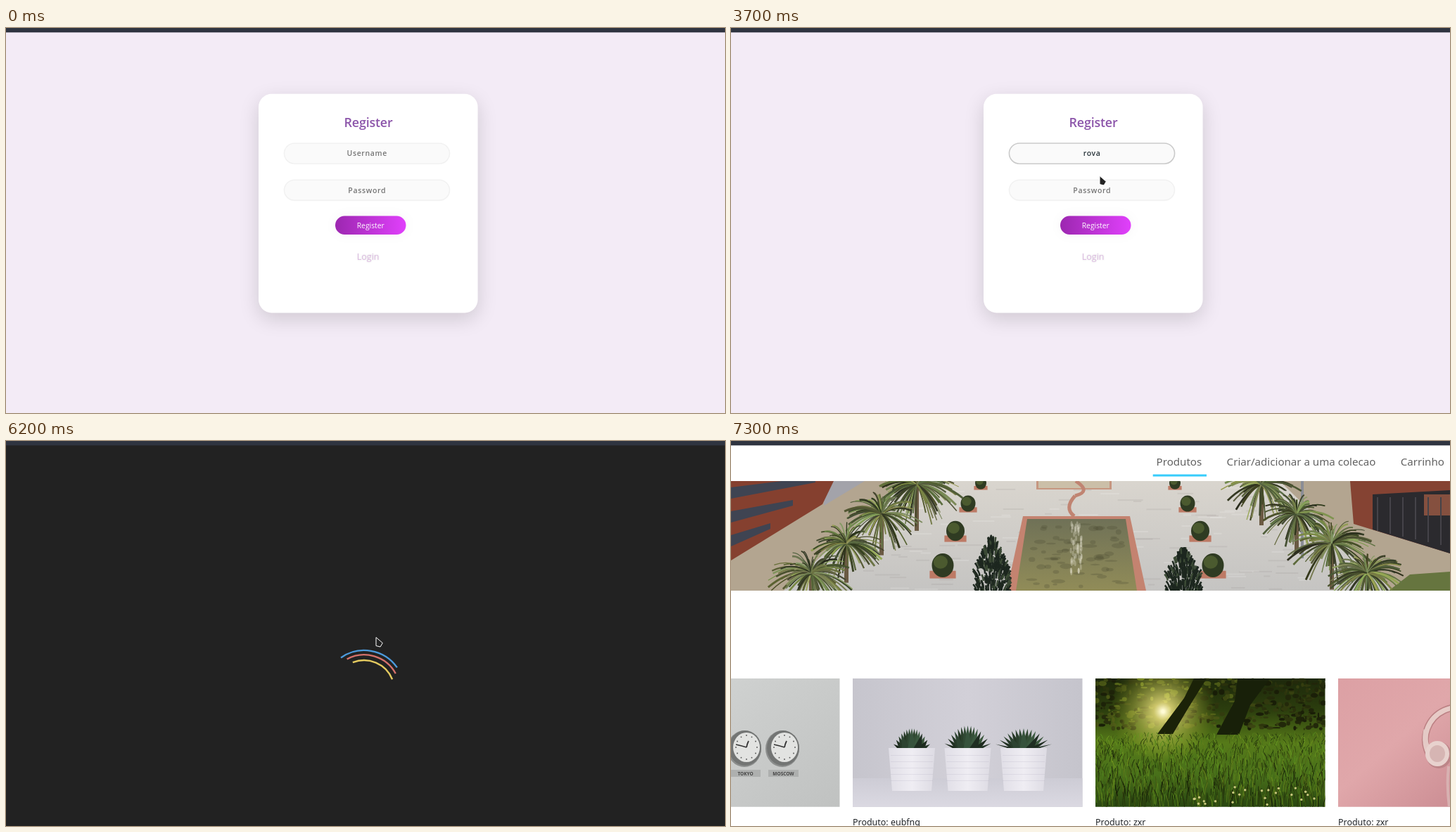
An HTML page with a canvas that plays this animation: 1022x548 px, repeating every 8.7 s.

```html
<!DOCTYPE html>
<html lang="pt">
<head>
<meta charset="utf-8">
<title>Register</title>
<style>
html, body { margin: 0; width: 100%; height: 100%; overflow: hidden; background: #f3ebf6; }
canvas { display: block; }
</style>
</head>
<body>
<canvas id="stage" width="1022" height="548"></canvas>
<script>
const W = 1022, H = 548, LOOP = 8700, STEP = 100;
const FORM = '"Open Sans", "Noto Sans", sans-serif';
const PAGE = '"Noto Sans", "Open Sans", sans-serif';
const LOGIN = 'rova';
const view = document.getElementById('stage').getContext('2d');
let c = view;

const clamp = p => Math.min(1, Math.max(0, p));
const easeOut = p => 1 - (1 - p) ** 1.6;
const smooth = p => p * p * (3 - 2 * p);
const cubic = p => p < .5 ? 4 * p ** 3 : 1 - 4 * (1 - p) ** 3;

// pointer strokes: each bends on its way to the next resting place
const MOVES = [
  { from: 200, to: 800, bend: [550, 92], end: [513, 183], ease: easeOut },
  { from: 3600, to: 3800, bend: [524, 210], end: [534, 236], ease: smooth },
  { from: 4900, to: 5500, bend: [555, 250], end: [525.5, 279], ease: easeOut },
  { from: 6550, to: 7300, bend: [545, 132], end: [493, -15], ease: smooth }
];

function seeded(s) {
  return () => (s = (s * 16807) % 2147483647) / 2147483647;
}

function times(n, fn) {
  for (let i = 0; i < n; i++) fn(i);
}

function poly(color, ...p) {
  c.fillStyle = color;
  c.beginPath();
  for (let i = 0; i < p.length; i += 2) c.lineTo(p[i], p[i + 1]);
  c.closePath();
  c.fill();
}

function taper(color, x, top, halfTop, bottom, halfBottom) {
  poly(color, x - halfTop, top, x + halfTop, top, x + halfBottom, bottom, x - halfBottom, bottom);
}

function rect(color, x, y, w, h) {
  c.fillStyle = color;
  c.fillRect(x, y, w, h);
}

function oval(color, x, y, rx, ry = rx) {
  c.fillStyle = color;
  c.beginPath();
  c.ellipse(x, y, rx, ry, 0, 0, 7);
  c.fill();
}

function pill(color, x, y, w, h, r = h / 2) {
  c.fillStyle = color;
  c.beginPath();
  c.roundRect(x, y, w, h, r);
  c.fill();
}

function curve(color, width, x0, y0, x1, y1, x2, y2) {
  c.strokeStyle = color;
  c.lineWidth = width;
  c.beginPath();
  c.moveTo(x0, y0);
  c.quadraticCurveTo(x1, y1, x2, y2);
  c.stroke();
}

function shade(x0, y0, x1, y1, ...colors) {
  const g = c.createLinearGradient(x0, y0, x1, y1);
  colors.forEach((k, i) => g.addColorStop(i / (colors.length - 1), k));
  return g;
}

function text(s, x, y, font, color, align = 'left', gap = 0) {
  c.font = font;
  c.fillStyle = color;
  c.textAlign = align;
  c.letterSpacing = gap + 'px';
  c.fillText(s, x, y);
  const w = c.measureText(s).width;
  c.letterSpacing = '0px';
  return w;
}

function shadow(color, blur, dy, draw) {
  c.save();
  c.shadowColor = color;
  c.shadowBlur = blur;
  c.shadowOffsetY = dy;
  draw();
  c.restore();
}

function layer(draw) {
  const el = document.createElement('canvas');
  el.width = W;
  el.height = H;
  c = el.getContext('2d');
  draw();
  c = view;
  return el;
}

function clip(x, y, w, h, draw) {
  c.save();
  c.beginPath();
  c.rect(x, y, w, h);
  c.clip();
  draw();
  c.restore();
}

function drawForm() {
  rect('#f3ebf6', 0, 0, W, H);
  shadow('rgba(0,0,0,.15)', 28, 8.6, () => pill('#fff', 359, 93.8, 311.6, 311.6, 18.7));
  text('Register', 515, 141, '600 17.9px ' + FORM, '#8c55aa', 'center', -0.2);
  shadow('rgba(0,0,0,.04)', 16, 0, () =>
    pill(shade(468, 0, 568, 0, '#9c27b0', '#e040fb'), 468, 267.5, 100.5, 26.5));
  text('Register', 518.2, 284.6, '10.3px ' + FORM, '#fff', 'center');
  shadow('rgba(117,117,117,.25)', 2.3, 0, () =>
    text('Login', 514.6, 329.6, '12.5px ' + FORM, '#dcbbe1', 'center'));
}

function bush(x, y, r) {
  rect('#bd7a65', x - r * 1.2, y + r * .5, r * 2.4, r * .7);
  oval('#2f3b22', x, y, r, r * 1.1);
  oval('#4b5a2f', x - r * .2, y - r * .3, r * .65, r * .6);
}

function cypress(x, top, w, rnd) {
  times(260, i => {
    const k = rnd(), y = top + 8 + k * (213 - top);
    const px = x + (rnd() - .5) * w * Math.min(1, .15 + k * 1.5);
    curve(i % 4 ? '#1d271f' : '#3b4a35', 2.5, px, y, px, y - 4, px + (px - x) * .2, y - 9);
  });
}

function palm(x, y, r, rnd) {
  rect('#6b5a43', x - 3, y, 6, r);
  times(100, i => {
    const a = rnd() * 6.283, l = r * (.4 + rnd() * .6);
    const ex = x + Math.cos(a) * l, ey = y + Math.sin(a) * l * .75 + l * .2;
    const tone = `hsl(${62 + rnd() * 25} ${18 + rnd() * 16}% ${14 + rnd() * 38}%)`;
    curve(tone, 1 + rnd() * 2, x, y, (x + ex) / 2, (y + ey) / 2 - l * .25, ex, ey);
  });
}

function plaza() {
  const rnd = seeded(41);
  rect(shade(0, 57, 0, 213, '#d9d5ce', '#c5c4c2'), 0, 57, W, 156);
  times(160, i => rect(i % 2 ? 'rgba(255,255,255,.15)' : 'rgba(105,102,100,.1)',
    180 + rnd() * 640, 57 + rnd() * 156, 8 + rnd() * 28, 2));

  // planted borders and buildings
  poly('#b3a590', 0, 213, 0, 130, 150, 57, 245, 57, 75, 213);
  poly('#b3a590', 780, 57, 880, 57, 1022, 160, 1022, 213, 940, 213);
  poly('#66753f', 935, 213, 965, 190, 1022, 186, 1022, 213);
  poly('#a3a3aa', 133, 57, 190, 57, 132, 92);
  poly('#85402f', 0, 57, 146, 57, 130, 90, 0, 170);
  times(3, i => poly('#3f4452', 0, 66 + i * 34, 120 - i * 32, 51 + i * 33, 120 - i * 32, 59 + i * 33, 0, 82 + i * 34));
  poly('#854333', 880, 57, 1022, 57, 1022, 160, 885, 118);
  poly('#2b2a2e', 912, 76, 1022, 70, 1022, 160, 912, 126);
  rect('#85503f', 985, 76, 37, 30);
  times(6, i => rect('#454349', 918 + i * 18, 80, 2, 48 + i * 4));
  rect('#8b8d96', 810, 57, 4, 110);

  rect('#c69680', 434, 57, 107, 12);
  rect('#cbbfa8', 437, 57, 101, 10);
  curve('#c08472', 5, 490, 57, 513, 72, 489, 78);
  curve('#c08472', 5, 489, 78, 473, 96, 488, 107);

  taper('#c48370', 491, 107, 76, 213, 99);
  taper(shade(0, 110, 0, 213, '#6f7157', '#918c58'), 491, 111, 70, 213, 86);
  times(60, () => oval('rgba(70,73,48,.25)', 425 + rnd() * 132, 116 + rnd() * 96, 3 + rnd() * 8, 1 + rnd() * 3));
  times(60, () => oval('rgba(236,233,214,.3)', 491 + (rnd() - .5) * 16, 118 + rnd() * 70, 1.5, 4));

  for (const side of [-1, 1]) {
    times(4, i => bush(493 + side * (138 + 18 * i), 60 + 24 * i + 5 * i * i, 8 + 2.5 * i));
    times(4, i => palm(509 + side * (245 + 50 * i), 62 + 42 * i, 52 + rnd() * 14, rnd));
    cypress(507 + side * 136, 143 + side * 9, 46, rnd);
  }
}

function clock(x, city) {
  oval('#8b8d8c', x - 1, 438, 24, 26);
  oval('#737574', x, 437, 23, 25);
  oval('#e2e3e1', x + 2, 436, 19, 21);
  times(12, i => oval('#555', x + 2 + Math.sin(i * .5236) * 15, 436 + Math.cos(i * .5236) * 17, .9));
  curve('#333', 1.5, x - 13, 432, x - 4, 434, x + 2, 436);
  curve('#333', 1.8, x + 2, 436, x + 3, 431, x + 5, 427);
  rect('#aeb0af', x - 21, 468, 43, 10);
  text(city, x + .5, 475.5, 'bold 6.5px ' + PAGE, '#444', 'center');
}

function clocks() {
  rect(shade(0, 338, 154, 520, '#cfd1d0', '#c0c2c1'), 0, 338, 155, 183);
  ['TOKYO', 'MOSCOW'].forEach((city, i) => clock(20 + i * 54, city));
}

function pot(x, spread, tall) {
  times(15, i => {
    const k = (i * 4 % 15) / 7 - 1, tip = 437 - tall * (1 - k * k * .8);
    poly(`hsl(${120 + i} 20% ${13 + i * 5 % 17}%)`, x + k * 14 - 6, 438, x + k * spread, tip, x + k * 14 + 6, 438);
  });
  taper(shade(x - 33, 0, x + 33, 0, '#e0dee6', '#efedf3', '#dddbe3'), x, 437, 33, 498, 28);
  times(5, i => rect('rgba(150,145,165,.16)', x - 30, 447 + i * 9, 60, 1));
}

function pots() {
  rect(shade(173, 0, 500, 0, '#c6c5cd', '#d2d0d8', '#c5c4cc'), 173, 338, 327, 183);
  rect(shade(0, 480, 0, 521, '#cdccd5', '#dbd9e2'), 173, 480, 327, 41);
  times(3, i => pot(257 + i * 79.5, 26 + i * 7, 28 + 4 * (i % 2)));
}

function meadow() {
  const rnd = seeded(97);
  rect(shade(0, 338, 0, 521, '#1d280b', '#2c3e0e', '#567a19', '#48701a', '#294611'), 518, 338, 327, 183);
  times(500, () => {
    const x = 518 + rnd() * 327, near = clamp(1 - Math.abs(x - 614) / 150);
    oval(`hsl(72 60% ${7 + rnd() * (9 + near * 18)}%)`, x, 338 + rnd() * 72, 1 + rnd() * 5, 1 + rnd() * 3);
  });
  const g = c.createRadialGradient(614, 385, 2, 614, 385, 75);
  g.addColorStop(0, '#fffbd5');
  g.addColorStop(.15, 'rgba(242,230,129,.8)');
  g.addColorStop(1, 'rgba(150,165,30,0)');
  rect(g, 539, 338, 150, 122);
  poly('#1b2208', 606, 417, 644, 366, 658, 338, 676, 338, 650, 380, 628, 417);
  poly('#182009', 690, 418, 716, 370, 720, 338, 766, 338, 738, 376, 722, 418);
  times(1500, i => {
    const x = 518 + rnd() * 327, y = 420 + i / 14, h = 6 + i / 100;
    const light = 12 + rnd() * 26 - i / 250;
    curve(`hsl(${76 + rnd() * 14} 65% ${light}%)`, 1, x, y, x, y - h / 2, x + (rnd() - .5) * 10, y - h);
  });
  times(24, () => oval('#c8c67d', 650 + rnd() * 185, 492 + rnd() * 26, 1.7));
}

function headphones() {
  rect(shade(863, 338, 1022, 521, '#dca0a4', '#e0a7aa', '#cc8e94'), 863, 338, 160, 183);
  c.beginPath();
  c.ellipse(1034, 425, 47, 46, 0, 2.7, 4.8);
  for (const [color, width] of [['#bc8184', 10], ['#e7cbc7', 7]]) {
    c.strokeStyle = color;
    c.lineWidth = width;
    c.stroke();
  }
  curve('#e4cac6', 7, 988, 411, 984, 431, 994, 441);
  oval('#bd8588', 1006, 447, 18, 19);
  oval('#e8d2ce', 1004, 445, 17, 18);
  oval('#d6b5b3', 1004, 445, 11, 12);
  curve('#d8b1b1', 4, 1020, 463, 1017, 490, 1021, 521);
}

function drawPage() {
  rect('#fff', 0, 0, W, H);
  let x = 604.6;
  for (const s of ['Produtos', 'Criar/adicionar a uma colecao', 'Carrinho'])
    x += text(s, x, 35, '15.1px ' + PAGE, '#626262') + 35.4;
  rect('#37ccfb', 599.7, 47.5, 76.3, 3);
  clip(0, 57, W, 156, plaza);
  [clocks, pots, meadow, headphones].forEach((draw, i) =>
    clip(i * 345 - 172, 337.7, 326.5, 183, draw));
  ['eubfnq', 'zxr', 'zxr'].forEach((s, i) =>
    text('Produto: ' + s, 173 + i * 345, 547, '12.46px ' + PAGE, '#212529'));
}

function pointer(t) {
  if (t < 200 || t >= 7300) return null;
  let pos = [587, 2];
  for (const m of MOVES) {
    const e = m.ease(clamp((t - m.from) / (m.to - m.from)));
    pos = pos.map((v, i) => (1 - e) ** 2 * v + 2 * e * (1 - e) * m.bend[i] + e * e * m.end[i]);
  }
  return pos;
}

function drawPointer(t) {
  const pos = pointer(t);
  if (!pos) return;
  const [x, y] = pos;
  const inField = t < 6200 && x > 395 && x < 631 && ((y > 163 && y < 194) || (y > 215 && y < 247));
  c.save();
  c.translate(Math.round(x), Math.round(y));
  if (inField) {
    rect('rgba(255,255,255,.75)', -1, -6, 3, 12);
    rect('#222', 0, -5, 1, 11);
    for (const v of [-6, 6]) {
      rect('#222', -3, v, 3, 1);
      rect('#222', 1, v, 3, 1);
    }
  } else {
    poly('#222', 0, .5, 0, 12.5, 6, 14, 9.3, 8.5);
    c.strokeStyle = '#fff';
    c.lineWidth = 1;
    c.stroke();
  }
  c.restore();
}

function field(y, focus) {
  pill('#fafafa', 395.4, y + .8, 235.2, 29.2);
  c.strokeStyle = focus ? 'rgba(0,0,0,.2)' : 'rgba(0,0,0,.045)';
  c.lineWidth = 1.6;
  c.stroke();
}

function label(s, y, color) {
  return text(s, 513.2, y, '600 10.5px ' + FORM, color, 'center', .65);
}

function caret(x, y) {
  rect('#263238', Math.round(x), y, 1, 13);
}

function formScene(t) {
  c.drawImage(form, 0, 0);
  const first = t >= 1100 && t < 4000, second = t >= 4000 && t < 5900;
  field(163.2, first);
  field(215.4, second);

  const count = [2000, 2300, 2600, 2800].filter(k => t >= k).length;
  const w = count ? label(LOGIN.slice(0, count), 182.3, '#263238') : 0;
  if (!count) label('Username', 182.3, '#757575');
  if (first && (t < 1600 || (t >= 2000 && t < 3500))) caret(513 + w / 2, 172);

  const typed = t >= 4600;
  if (typed) oval('#263238', 513, 231, 1.8);
  else label('Password', 234.5, '#757575');
  if (second && t < 5100) caret(typed ? 515 : 513, 224);
}

function arc(color, r, turns) {
  const a = (turns - .25) * 2 * Math.PI;
  c.strokeStyle = color;
  c.lineWidth = 2.4;
  c.beginPath();
  c.arc(509, 355.3, r, a - Math.PI / 4, a + Math.PI / 4);
  c.stroke();
}

function pageScene(t) {
  c.drawImage(page, 0, 0);
  const open = cubic(clamp((t - 6640) / 357));
  rect('#222', 0, 0, Math.round(517.6 * (1 - open)), H);
  rect('#222', Math.round(498.5 + 523.5 * open), 0, W, H);

  // each ring turns inside the outer one
  const s = (t - 6145) / 1000;
  c.globalAlpha = (1 - clamp((t - 6340) / 300)) ** 2;
  arc('#4c9bdd', 57.3, s / 2);
  arc('#d6726c', 51, s / 2 + s / 3);
  arc('#e4ca5f', 43.2, s / 2 + s / 1.5);
  c.globalAlpha = 1;
}

const form = layer(drawForm), page = layer(drawPage);
const start = performance.now();

function frame() {
  const t = Math.floor((performance.now() - start) % LOOP / STEP) * STEP;
  if (t < 6200) formScene(t);
  else pageScene(t);
  rect('#2f3440', 0, 0, W, 6.3);
  drawPointer(t);
  requestAnimationFrame(frame);
}
frame();
</script>
</body>
</html>
```
